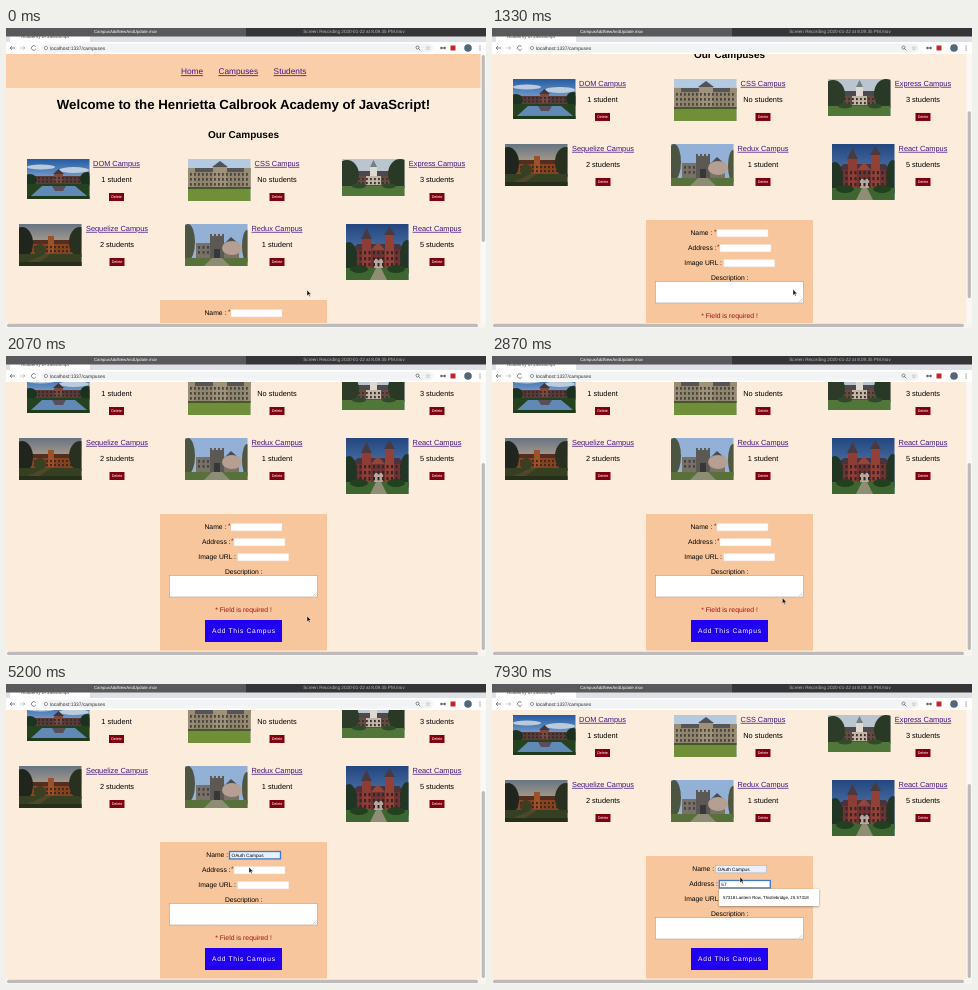
An HTML page for the animation above (8000 ms loop, 480 px wide and 300 px high).

```html
<!DOCTYPE html>
<html lang="en">
<head>
<meta charset="utf-8">
<title>Campuses</title>
<style>
html, body { margin: 0; width: 100%; height: 100%; overflow: hidden; background: #fcecdb; }
#stage { display: block; width: 480px; height: 300px; }
text { font-family: "Liberation Sans", Arial, sans-serif; text-rendering: geometricPrecision; white-space: pre; }
</style>
</head>
<body>
<svg id="stage" viewBox="0 0 480 300"></svg>
<script>
const NAV = '#fbceaa', PEACH = '#f7c69c', CREAM = '#fcecdb', LINK = '#431487', RED = '#a30d18';
const VIEW_TOP = 26, VIEW_H = 269, LOOP = 8000, STEP = 200 / 3;

const rect = (x, y, w, h, fill, more = '') =>
  `<rect x="${x}" y="${y}" width="${w}" height="${h}" fill="${fill}" ${more}/>`;
const poly = (points, fill) => `<polygon points="${points}" fill="${fill}"/>`;
const blob = (x, y, rx, ry, fill) => `<ellipse cx="${x}" cy="${y}" rx="${rx}" ry="${ry}" fill="${fill}"/>`;
// y is the middle of the capitals
const text = (x, y, size, str, more = '', anchor = 'middle') =>
  `<text x="${x}" y="${y + size * 0.36}" font-size="${size}" text-anchor="${anchor}" ${more}>${str}</text>`;
const link = (x, y, size, str) =>
  text(x, y, size, str, `fill="${LINK}" text-decoration="underline"`);
const group = (id, body) => `<g id="${id}">${body}</g>`;
const repeat = (n, fn) => Array.from({ length: n }, (_, i) => fn(i)).join('');
const windows = (x, y, cols, rows, dx, dy, fill) =>
  repeat(cols * rows, i => rect(x + (i % cols) * dx, y + Math.floor(i / cols) * dy, dx * 0.45, dy * 0.55, fill));

// Simplified campus pictures, each drawn from its own top left corner
const photos = {
  dom: () => rect(0, 0, 63, 41, 'url(#blueSky)') + blob(14, 8, 14, 2.5, '#b9cade') + blob(47, 11, 15, 3, '#bccbdc') +
    rect(0, 17, 63, 8, '#5b3b37') + rect(27, 14, 9, 10, '#794a40') + poly('26,15 31.5,10 37,15', '#453738') +
    windows(3, 18, 14, 2, 4, 3.5, '#34282b') +
    blob(3, 21, 7, 6, '#1d3322') + blob(60, 20, 7, 7, '#1c3020') + rect(0, 25, 63, 16, '#24421f') +
    poly('15,27 48,27 60,37 4,37', '#608ab5') + poly('25,27 39,27 36,32 28,32', '#594e5a') +
    rect(0, 37, 63, 4, '#20391b'),
  css: () => rect(0, 0, 63, 42, '#b4cae0') + rect(0, 12, 63, 18, '#90846c') + rect(0, 9, 63, 4, '#535559') +
    rect(25, 7, 14, 23, '#9f9279') + poly('24,8 32,2 40,8', '#505159') + rect(0, 9, 7, 21, '#998c73') +
    rect(56, 9, 7, 21, '#998c73') + windows(2, 14, 15, 3, 4, 5, '#46443f') +
    rect(0, 30, 63, 12, '#718e39') + rect(0, 28, 63, 2, '#465730'),
  express: () => rect(0, 0, 63, 37, '#bac5cf') + rect(6, 16, 52, 11, '#674b42') + poly('4,17 10,12 54,12 60,17', '#4c494b') +
    rect(28, 8, 7, 10, '#ddd9d1') + poly('28,8 31.5,1 35,8', '#718083') + rect(24, 17, 15, 9, '#c2b7a7') +
    windows(8, 19, 12, 2, 4, 4, '#3c3031') + blob(5, 16, 12, 15, '#2c3c28') + blob(58, 15, 12, 15, '#2a3926') +
    rect(0, 27, 63, 10, '#50763a') + blob(17, 27, 7, 2.5, '#304b29') + blob(47, 27, 7, 2.5, '#304b29'),
  sequelize: () => rect(0, 0, 63, 42, 'url(#dusk)') + rect(9, 20, 46, 10, '#87421f') + poly('7,20 14,16 50,16 57,20', '#532d20') +
    rect(29, 12, 6, 17, '#9c512a') + windows(11, 22, 11, 2, 4, 4, '#402619') +
    blob(3, 19, 11, 16, '#20261d') + blob(61, 18, 11, 15, '#28301f') + blob(21, 26, 6, 6, '#3b3f22') +
    rect(0, 30, 63, 12, '#344021') + poly('26,30 32,30 15,42 0,42', '#4e4728') + rect(0, 38, 63, 4, '#252f1a'),
  redux: () => rect(0, 0, 63, 42, '#93b0d6') + rect(11, 19, 43, 16, '#797067') + rect(25, 12, 14, 23, '#5c5955') +
    repeat(4, i => rect(25 + i * 4, 10, 2, 3, '#5c5955')) + poly('39,20 46,13 54,20', '#4a4c53') +
    rect(29, 25, 6, 10, '#373739') + windows(13, 22, 3, 2, 4.5, 5, '#42464b') +
    blob(47, 24, 10, 7, '#b59f93') + blob(3, 18, 7, 18, '#4c5442') + blob(62, 22, 5, 16, '#51573e') +
    rect(0, 34, 63, 8, '#58703a') + poly('27,34 37,34 45,42 19,42', '#8d8d75'),
  react: () => rect(0, 0, 63, 56, 'url(#deepSky)') + rect(6, 25, 52, 20, '#6f3431') + poly('4,26 12,20 53,20 60,26', '#47343c') +
    rect(16, 14, 9, 30, '#8c3d35') + poly('15,15 20.5,4 26,15', '#4b3940') +
    rect(39, 10, 9, 34, '#934136') + poly('38,11 43.5,2 49,11', '#4b3940') + poly('25,26 32,18 39,26', '#93453b') +
    rect(28, 35, 9, 9, '#b8a89a') + windows(9, 27, 11, 3, 4.5, 6, '#30262d') +
    blob(3, 34, 8, 16, '#213525') + blob(61, 33, 7, 17, '#233624') +
    rect(0, 44, 63, 12, '#3d6530') + poly('30,44 35,44 41,56 24,56', '#8f8d73') +
    blob(13, 45, 9, 4, '#22401f') + blob(50, 45, 9, 4, '#22401f')
};

// photo, picture x, card top, picture height, text centre, name, students
const cards = [
  ['dom', 21, 131, 40, 110.5, 'DOM Campus', '1 student'],
  ['css', 182, 131, 42, 271, 'CSS Campus', 'No students'],
  ['express', 336, 131, 37, 431, 'Express Campus', '3 students'],
  ['sequelize', 13, 196, 42, 111, 'Sequelize Campus', '2 students'],
  ['redux', 179, 196, 42, 271, 'Redux Campus', '1 student'],
  ['react', 340, 196, 56, 431, 'React Campus', '5 students']
];
const card = ([photo, px, y, height, cx, name, count]) =>
  `<svg x="${px}" y="${y}" width="62.5" height="${height}" overflow="hidden">${photos[photo]()}</svg>` +
  link(cx, y + 4.2, 7.4, name) + text(cx, y + 20.2, 7.4, count) +
  rect(cx - 7.5, y + 34, 15, 8, '#800010') + text(cx, y + 38, 3.7, 'Delete', 'fill="#fff"');

const inputBox = (x, y) => rect(x, y - 3.7, 51, 7.4, '#fff', 'stroke="#efe0d2" stroke-width=".5"');
const input = (id, y) => group(id, inputBox(0, y) + text(2, y, 4.7, '', '', 'start'));
const label = (id, y, str) => group(id, text(0, y, 6.75, str, '', 'start'));
const star = (id, x, y) => text(x, y, 6.7, '*', `id="${id}" fill="${RED}"`);
const popup = (id, x, y, w, str) => group(id,
  rect(x, y, w, 17, '#fff', 'rx="1" filter="url(#shadow)"') + text(x + 4, y + 8.5, 4.35, str, '', 'start'));

const form =
  `<rect id="panel" x="154" y="272" width="167" height="137" fill="${PEACH}"/>` +
  label('nameLabel', 284.7, 'Name :') + star('nameStar', 223.3, 284) + input('nameBox', 285.2) +
  label('addrLabel', 299.7, 'Address :') + star('addrStar', 226.4, 299) + input('addrBox', 300.2) +
  text(192.3, 314.7, 6.75, 'Image URL :', '', 'start') + inputBox(231.8, 315.2) +
  text(237.7, 329.5, 6.75, 'Description :') +
  rect(163.5, 333.5, 148, 21.5, '#fff', 'stroke="#aaa29a" stroke-width=".6"') +
  '<path d="M307 354l3.5-3.5M309 354l1.5-1.5" stroke="#999" stroke-width=".4"/>' +
  text(237.5, 367.7, 6.8, '* Field is required !', `id="required" fill="${RED}"`) +
  group('submit', rect(199, 378, 77, 22, '#2100f2') +
    text(237.9, 389, 6.66, 'Add This Campus', 'fill="#fff" letter-spacing=".72"')) +
  popup('namePopup', 223.5, 290, 64.5, 'OAuth Campus') +
  popup('addrPopup', 227, 305, 100, '57318 Lantern Row, Thistlebridge, JS 57318');

const page =
  rect(0, 26, 475, 34, NAV) +
  link(186, 43.3, 8.3, 'Home') + link(232.3, 43.3, 8.3, 'Campuses') + link(284, 43.3, 8.3, 'Students') +
  text(237.5, 76.2, 13.25, 'Welcome to the Henrietta Calbrook Academy of JavaScript!', 'font-weight="bold"') +
  text(237.5, 106.2, 10, 'Our Campuses', 'font-weight="bold"') +
  cards.map(card).join('') + form;

const browser =
  rect(0, 0, 480, 15, '#dee1e5') + rect(4, 8, 80, 8, '#fff') +
  text(15, 8.6, 4.7, 'Academy of JavaScript', 'fill="#555"', 'start') +
  rect(0, 0, 240, 8.5, '#59595b') + rect(240, 0, 240, 8.5, '#353537') +
  text(119.5, 3.6, 4.3, 'CampusAddNewAndUpdate.mov', 'fill="#fff"') +
  text(348, 3.6, 4.6, 'Screen Recording 2020-01-22 at 8.09.35 PM.mov', 'fill="#b8b8b8"') +
  rect(0, 14, 480, 12, '#fff') + rect(36, 15.5, 391, 9, '#f1f3f4', 'rx="4.5"') +
  '<g fill="none" stroke="#666" stroke-width=".8"><path d="M9 20H4l2-2m-2 2l2 2"/>' +
  '<path d="M14 20h5l-2-2m2 2l-2 2" stroke="#bbb"/><path d="M29.5 18.5a2.3 2.3 0 1 0 .3 2.5"/>' +
  '<circle cx="40" cy="20" r="1.6" stroke-width=".6"/>' +
  '<circle cx="411.5" cy="19.5" r="1.5"/><path d="M412.6 20.6l1.6 1.6"/></g>' +
  text(422, 20, 6, '☆', 'fill="#666"') +
  text(44, 20, 4.9, 'localhost:1337/campuses', 'fill="#333"', 'start') +
  blob(435.5, 20, 1.3, 1.3, '#666') + blob(438.5, 20, 1.3, 1.3, '#666') +
  rect(444.5, 17.5, 5, 5, '#c8242b') + blob(462, 20, 3.8, 3.8, '#526879') +
  repeat(3, i => blob(474, 18 + i * 2, 0.6, 0.6, '#555')) +
  rect(0, 295, 480, 5, '#f7f4f1') + rect(1, 295.8, 471, 3.2, '#bdbbb9', 'rx="1.6"');

const gradient = (id, top, bottom) =>
  `<linearGradient id="${id}" x2="0" y2="1"><stop stop-color="${top}"/><stop offset=".6" stop-color="${bottom}"/></linearGradient>`;

document.getElementById('stage').innerHTML =
  `<defs>${gradient('blueSky', '#245ba3', '#8fb0d6')}${gradient('dusk', '#667482', '#c0aa91')}${gradient('deepSky', '#23467f', '#5279ae')}` +
  '<filter id="shadow" x="-10%" y="-20%" width="120%" height="150%"><feDropShadow dx="0" dy=".7" stdDeviation=".8" flood-opacity=".4"/></filter></defs>' +
  rect(0, 0, 480, 300, CREAM) + group('page', page) +
  rect(474.5, 26, 5.5, 269, '#faf8f6') +
  '<rect id="thumb" x="475.7" width="3.2" rx="1.6" fill="#bdbbb9"/>' + browser +
  '<path id="cursor" d="M0 0V5.8L1.4 4.6L2.3 6.6L3.2 6.2L2.3 4.3H4.1Z" fill="#111" stroke="#fff" stroke-width=".4"/>';

const $ = id => document.getElementById(id);
const show = (id, on) => $(id).setAttribute('visibility', on ? 'visible' : 'hidden');
const move = (id, x, y) => $(id).setAttribute('transform', `translate(${x} ${y})`);

const scrollKeys = [[990, 0], [1000, 14], [1066, 36], [1133, 50], [1200, 62], [1333, 80], [1533, 101], [1800, 114]];
const cursorX = [[2730, 301], [3400, 249], [4470, 249], [4800, 243], [5400, 243], [5600, 262], [5800, 246], [7470, 246], [7800, 248]];
const cursorY = [[1000, 262], [2000, 260], [2730, 260], [3400, 171], [4470, 171], [4800, 183], [7470, 184], [7800, 193]];

function at(keys, t) {
  const i = keys.findIndex(k => k[0] > t);
  if (i === 0) return keys[0][1];
  if (i < 0) return keys[keys.length - 1][1];
  const [t0, a] = keys[i - 1], [t1, b] = keys[i];
  return a + (b - a) * (t - t0) / (t1 - t0);
}

function field(id, x, value, focused, filled, caret) {
  move(id, x, 0);
  const [box, words] = $(id).children;
  box.setAttribute('fill', filled ? '#e8f0fe' : '#fff');
  box.setAttribute('stroke', focused ? '#3c78cf' : filled ? '#aaa' : '#efe0d2');
  box.setAttribute('stroke-width', focused ? 1.3 : 0.5);
  words.textContent = value + (caret ? '|' : '');
}

function draw(t) {
  const name = t < 3730 ? '' : t < 4860 ? 'O' : 'OAuth Campus';
  const addr = t < 6330 ? '' : t < 7195 ? '5' : '57';
  const required = !name || !addr;
  const maxScroll = required ? 114 : 100;
  const scroll = Math.min(at(scrollKeys, t), maxScroll);
  const total = VIEW_H + maxScroll;

  move('page', 0, -scroll);
  $('thumb').setAttribute('y', VIEW_TOP + 1 + scroll * VIEW_H / total);
  $('thumb').setAttribute('height', VIEW_H * VIEW_H / total - 2);

  move('nameLabel', name ? 200.3 : 198.5, 0);
  move('addrLabel', addr ? 197.3 : 196, 0);
  show('nameStar', !name);
  show('addrStar', !addr);
  const onName = t >= 3460 && t < 5990, onAddr = t >= 5990;
  field('nameBox', name ? 223.5 : 225, name, onName, name.length > 1, onName && !name);
  field('addrBox', addr ? 227.3 : 228, addr, onAddr, false, onAddr && addr.length < 2 && t < 6460);

  show('required', required);
  move('submit', 0, required ? 0 : -14);
  $('panel').setAttribute('height', required ? 136.5 : 122.5);
  show('namePopup', name === 'O');
  show('addrPopup', t >= 6460);

  show('cursor', !(t >= 3730 && t < 4465) && !(t >= 6330 && t < 7465));
  move('cursor', at(cursorX, t), at(cursorY, t));
}

function tick() {
  const t = performance.now() % LOOP;
  draw(Math.floor((t + 4) / STEP) * STEP);
  requestAnimationFrame(tick);
}
tick();
</script>
</body>
</html>
```
